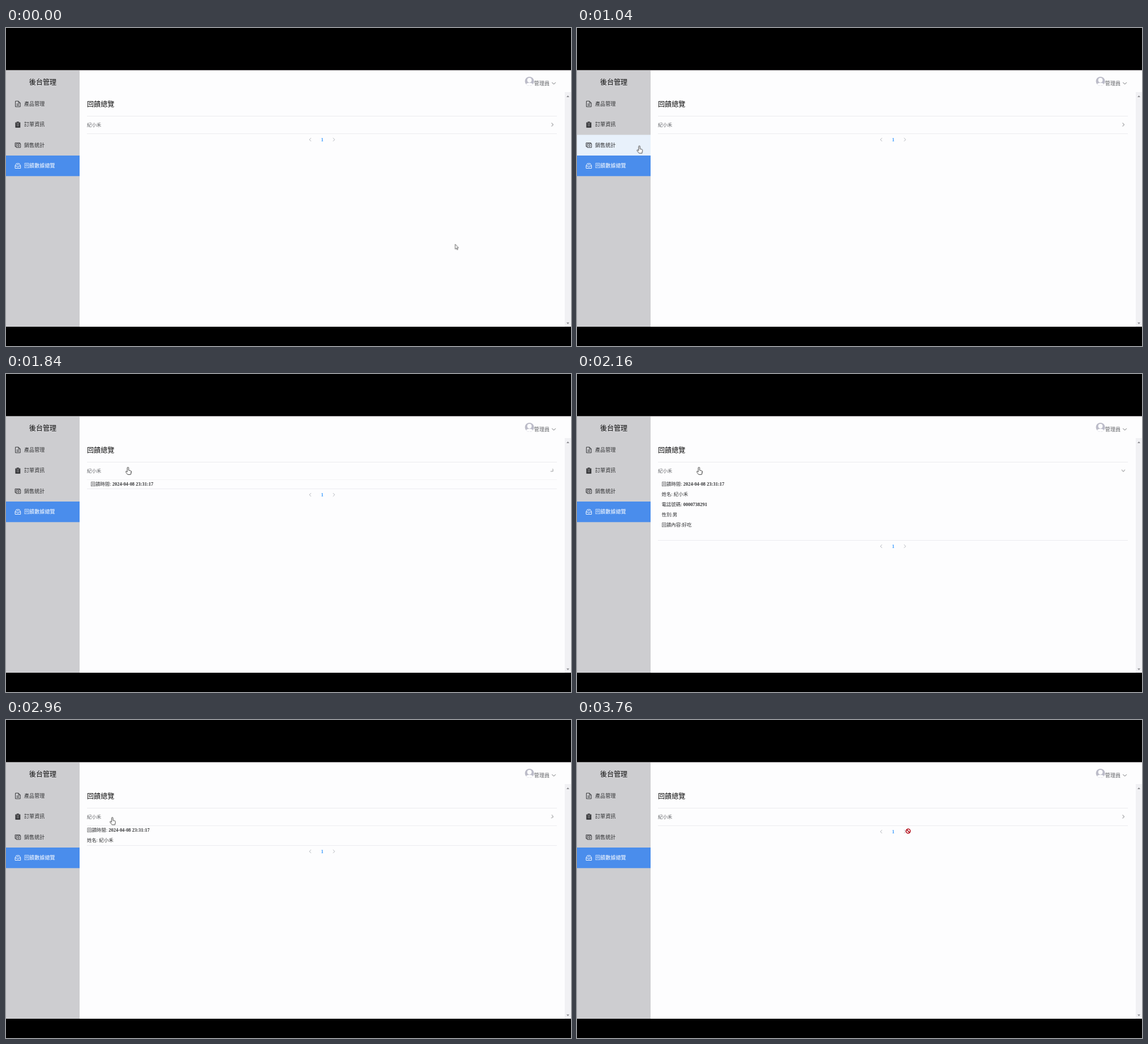
An HTML page for the animation above (3800 ms loop, 998 by 561 pixels).

```html
<!DOCTYPE html>
<html lang="zh-Hant">
<head>
<meta charset="utf-8">
<title>後台管理</title>
<style>
html, body { margin: 0; width: 100%; height: 100%; overflow: hidden; background: #000; }
svg { display: block; width: 998px; height: 561px; }
text { font-family: "Noto Sans CJK TC", "Noto Sans CJK SC", "Noto Sans CJK JP", sans-serif; fill: #303133; }
.title { font-size: 12.1px; font-weight: 500; fill: #111; }
.menu { font-size: 9.1px; }
.small { font-size: 8.45px; }
.details text { font-family: "Liberation Serif", "Noto Sans CJK TC", "Noto Sans CJK SC", "Noto Sans CJK JP", serif; }
.num { font-family: "Liberation Serif", serif; font-weight: 700; }
.icon { fill: none; stroke: #303133; stroke-width: .95; stroke-linejoin: round; }
.chev { fill: none; stroke: #606266; stroke-width: .9; }
.off { stroke: #a8abb2; }

.hover, .pager, .details, .edge, .turn, .cursor, .arrow, .hand, .ban { animation: 3.8s linear infinite; }
.hover { animation-name: hover; animation-timing-function: ease; }
.pager { animation-name: fold; animation-timing-function: ease-in-out; }
.edge { animation-name: edge; animation-timing-function: ease; }
.turn { animation-name: turn; animation-timing-function: ease; }
.details { animation-name: indent; animation-timing-function: step-end; }
.cursor { animation-name: move; }
.arrow { animation-name: arrow; animation-timing-function: step-end; }
.hand { animation-name: hand; animation-timing-function: step-end; }
.ban { animation-name: ban; animation-timing-function: step-end; }

@keyframes hover {
  0%, 21.05%, 37.24%, 79.47%, 98.42%, 100% { opacity: 0; }
  28.95%, 29.34%, 87.37%, 90.53% { opacity: 1; }
}
@keyframes fold {
  0%, 46.32%, 81.05%, 100% { transform: translateY(0); }
  54.21%, 73.16% { transform: translateY(107px); }
}
@keyframes edge {
  0%, 46.32%, 81.05%, 100% { opacity: 1; }
  54.21%, 73.16% { opacity: 0; }
}
@keyframes turn {
  0%, 46.32%, 81.05%, 100% { transform: rotate(0deg); }
  54.21%, 73.16% { transform: rotate(90deg); }
}
@keyframes indent {
  0%, 100% { transform: translateX(0); }
  73.16% { transform: translateX(-6.5px); }
}
@keyframes move {
  0% { transform: translate(793.5px, 381.5px); }
  14.74% { transform: translate(757px, 336px); animation-timing-function: ease-out; }
  21.05% { transform: translate(113px, 214.5px); }
  27.9% { transform: translate(110px, 208px); }
  29.34% { transform: translate(130px, 200px); }
  33.68% { transform: translate(203px, 171.5px); animation-timing-function: ease-out; }
  44.21%, 70% { transform: translate(215.5px, 165px); }
  73.16% { transform: translate(192px, 172px); }
  77.89% { transform: translate(189px, 172px); }
  79.47% { transform: translate(130px, 190px); animation-timing-function: ease-out; }
  85.26% { transform: translate(98px, 198.5px); }
  89.47% { transform: translate(100px, 200px); }
  90.53% { transform: translate(130px, 200px); }
  95.79% { transform: translate(530px, 197px); }
  98.95%, 100% { transform: translate(585px, 196px); }
}
@keyframes arrow {
  0%, 29.34%, 90.53% { opacity: 1; }
  20.9%, 31.45%, 95.79%, 100% { opacity: 0; }
}
@keyframes hand {
  0%, 29.34%, 90.53%, 98.03%, 100% { opacity: 0; }
  20.9%, 31.45%, 96.84% { opacity: 1; }
}
@keyframes ban {
  0%, 96.84% { opacity: 0; }
  95.79%, 98.03%, 100% { opacity: 1; }
}
</style>
</head>
<body>
<svg viewBox="0 0 998 561">
  <rect y="74" width="998" height="453" fill="#fdfdfe"/>

  <!-- feedback list -->
  <text class="title" x="143" y="139.1">回饋總覽</text>
  <g class="details">
    <text class="small" x="149.5" y="196.7">回饋時間: <tspan class="num">2024-04-08 23:31:17</tspan></text>
    <text class="small" x="149.5" y="214.8">姓名: 紀小禾</text>
    <text class="small" x="149.5" y="233">電話號碼: <tspan class="num">0000738291</tspan></text>
    <text class="small" x="149.5" y="251.2">性別:男</text>
    <text class="small" x="149.5" y="269.3">回饋內容:好吃</text>
  </g>
  <g class="pager">
    <rect x="130" y="186" width="857" height="341" fill="#fdfdfe"/>
    <rect x="143" y="186" width="830" height="1" fill="#ebebef"/>
    <path class="chev off" d="M538.8 194l-2.9 2.9 2.9 2.9M577.7 194l2.9 2.9-2.9 2.9"/>
    <text class="num" x="558.5" y="200.1" font-size="9.1" text-anchor="middle" style="fill:#409eff">1</text>
  </g>
  <rect x="143" y="155" width="830" height="1" fill="#ebebef"/>
  <rect class="edge" x="143" y="186" width="830" height="1" fill="#ebebef"/>
  <text class="small" x="143" y="173.5" style="fill:#606266">紀小禾</text>
  <g transform="translate(965 170.5)"><path class="chev turn" d="M-1.5-3.1L1.6 0-1.5 3.1"/></g>

  <!-- account -->
  <circle cx="924.6" cy="94" r="8" fill="#bcbcc9"/>
  <circle cx="924.6" cy="92" r="3.9" fill="#fdfdfe"/>
  <path d="M918.4 99q2.2-2.5 6.2-2.5t6.2 2.5q-2.5 3-6.2 3t-6.2-3z" fill="#fdfdfe"/>
  <text class="menu" x="932.8" y="101.3" style="fill:#606266">管理員</text>
  <path class="chev" d="M964.3 95.9l3.3 3.3 3.3-3.3"/>

  <!-- scrollbar -->
  <rect x="987" y="113" width="11" height="414" fill="#f1f1f4"/>
  <path d="M990 122l2.5-3 2.5 3zM990 519.5l2.5 3 2.5-3z" fill="#8b8b90"/>

  <!-- sidebar -->
  <rect y="74" width="130" height="453" fill="#cdcdd0"/>
  <rect class="hover" y="188.5" width="130" height="36.5" fill="#e9f3fd"/>
  <rect y="225" width="130" height="36.3" fill="#4a8dec"/>
  <text class="title" x="65" y="100.4" text-anchor="middle">後台管理</text>
  <text class="menu" x="32" y="136.8">產品管理</text>
  <text class="menu" x="32" y="173.3">訂單資訊</text>
  <text class="menu" x="32" y="209.8">銷售統計</text>
  <text class="menu" x="32" y="246.3" style="fill:#fff">回饋數據總覽</text>
  <g class="icon">
    <path transform="translate(16 128.5)" d="M.6.5H6l3.2 3.1v6.8H.6zM6 .5v3.1h3.2M2.6 5.6h4.6M2.6 7.9h4.6"/>
    <g transform="translate(16 165)" stroke="none" fill="#303133">
      <path d="M.5 1.5h8.8v9.2H.5zM2.9.2h4v2.5h-4z"/>
      <path d="M2.6 5.2h4.6M2.6 7.6h4.6M2.4 2.9h5" stroke="#cdcdd0" stroke-width=".7"/>
    </g>
    <g transform="translate(15.5 202)">
      <path d="M2.6 7.2H.6V.7h8.6v1.4M2.6 2.2h7.6v6.6H2.6z"/>
      <circle cx="6.4" cy="5.5" r="1.5"/>
    </g>
    <path transform="translate(15.5 237.7)" stroke="#fff" d="M.6 5.2L3 1.3h4.8l2.4 3.9v4.6H.6zM.6 5.7h2.6q.4 1.8 2.2 1.8t2.2-1.8h2.6M3.9 3.6h3"/>
  </g>

  <rect y="74" width="998" height="1" fill="#8f8b8e"/>
  <rect y="527" width="998" height="34"/>

  <g class="cursor">
    <path class="arrow" d="M0 0v8.7l2-1.8 1.4 2.9 1.3-.6-1.4-2.9h2.6z" fill="#fff" stroke="#333" stroke-width=".75"/>
    <path class="hand" d="M-1.3 6.6V.7a1.2 1.2 0 0 1 2.4 0V4.8l3.2.8q1.4.4 1.2 1.9l-.9 4.9h-5.2L-4 8.1q-.6-1.4.6-1.7.9-.1 2.1 1.6z" fill="#fff" stroke="#222" stroke-width=".85" stroke-linejoin="round"/>
    <g class="ban" fill="#fff" stroke="#b3101c" stroke-width="1.6">
      <circle r="3.7"/>
      <path d="M-2.6-2.6l5.2 5.2"/>
    </g>
  </g>
</svg>
<style>
.turn { transform-origin: 0 0; }
</style>
</body>
</html>
```
